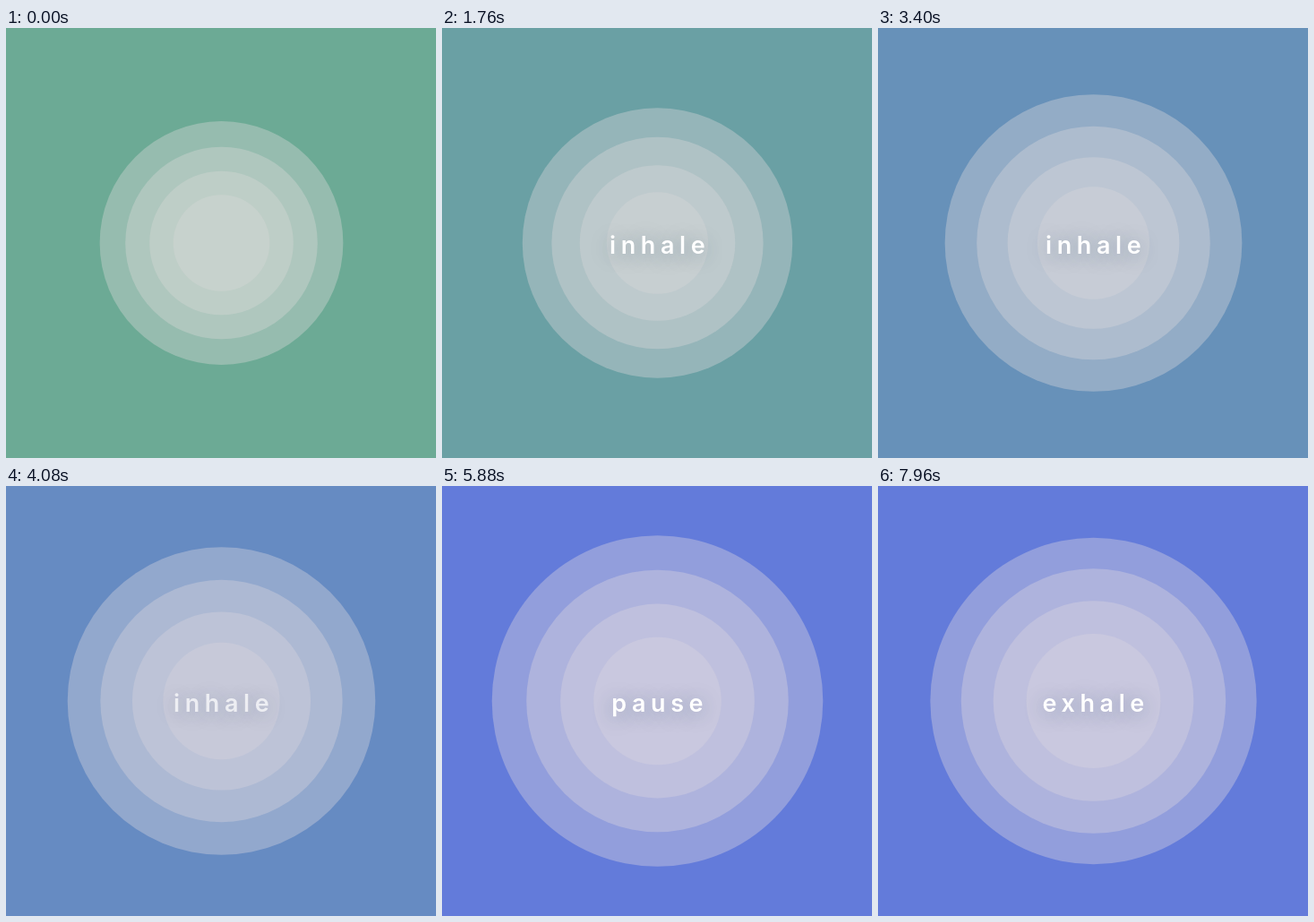
Recreate the animation shown at these times as an HTML page with a canvas. Size 480 px wide and 480 px high, loop 8 s.

```html
<!DOCTYPE html>
<html lang="en">
<head>
<meta charset="utf-8">
<title>Breathe</title>
<style>
  html, body { margin: 0; width: 100%; height: 100%; overflow: hidden; }
  canvas { display: block; width: 100vw; height: 100vh; }
</style>
</head>
<body>
<canvas id="stage" width="480" height="480"></canvas>
<script>
const ctx = document.getElementById('stage').getContext('2d');
const LOOP = 8000;

// The rings are 5, 4, 3 and 2 units in radius; each one breathes a little later.
const RINGS = [5, 4, 3, 2];
const RING_DELAY = 333;
const UNIT_MIN = 26.75, UNIT_MAX = 37.5;
const INHALE_START = -500, INHALE_END = 6750, EXHALE_TIME = 5930;

const GREEN = [108, 170, 149], BLUE = [99, 123, 218];
const GREEN_LIGHT = [212, 214, 212], BLUE_LIGHT = [214, 210, 222];

const FADE = 640;
const WORDS = [
  { text: 'inhale', from: 200, to: 4500 },
  { text: 'pause', from: 4720, to: 6750 },
  { text: 'exhale', from: 6900, to: 9500 }
];

const lerp = (a, b, p) => a + (b - a) * p;
const progress = (from, to, t) => Math.min(1, Math.max(0, (t - from) / (to - from)));
const smooth = p => p * p * (3 - 2 * p);
const cosine = p => (1 - Math.cos(Math.PI * p)) / 2;
const mix = (a, b, p) => a.map((c, i) => Math.round(lerp(c, b[i], p))).join();

// cubic-bezier(x1, 0, x2, 1), solved by bisection
function bezierEase(x1, x2, x) {
  let low = 0, high = 1;
  for (let i = 0; i < 24; i++) {
    const u = (low + high) / 2, v = 1 - u;
    if (3 * u * v * (v * x1 + u * x2) + u ** 3 < x) low = u;
    else high = u;
  }
  return smooth(low);
}

function unitSize(t) {
  let level;
  if (t < INHALE_START) {
    level = cosine(progress(INHALE_START, INHALE_START - EXHALE_TIME, t));
  } else if (t < INHALE_END) {
    level = bezierEase(0.14, 0.75, progress(INHALE_START, INHALE_END, t));
  } else {
    level = 1 - cosine(progress(INHALE_END, INHALE_END + EXHALE_TIME, t));
  }
  return lerp(UNIT_MIN, UNIT_MAX, level);
}

function drawWord(text, opacity) {
  ctx.save();
  ctx.globalAlpha = opacity;
  ctx.font = '600 27px Inter, sans-serif';
  ctx.letterSpacing = '5.6px';
  ctx.textAlign = 'center';
  ctx.fillStyle = '#fff';
  ctx.shadowColor = 'rgba(20, 60, 90, 0.4)';
  ctx.shadowBlur = 22;
  ctx.shadowOffsetY = 3;
  ctx.fillText(text, 243.2, 251.5);
  ctx.restore();
}

function draw(t) {
  const tint = progress(650, 5900, t);
  ctx.fillStyle = `rgb(${mix(GREEN, BLUE, tint)})`;
  ctx.fillRect(0, 0, 480, 480);

  ctx.fillStyle = `rgba(${mix(GREEN_LIGHT, BLUE_LIGHT, tint)}, 0.4)`;
  RINGS.forEach((units, i) => {
    ctx.beginPath();
    ctx.arc(240.5, 240, units * unitSize(t - i * RING_DELAY), 0, Math.PI * 2);
    ctx.fill();
  });

  for (const { text, from, to } of WORDS) {
    const opacity = smooth(progress(from, from + FADE, t)) * smooth(progress(to, to - FADE, t));
    if (opacity > 0) drawWord(text, opacity);
  }
}

const start = performance.now();
function tick() {
  draw((performance.now() - start) % LOOP);
  requestAnimationFrame(tick);
}
tick();
</script>
</body>
</html>
```
